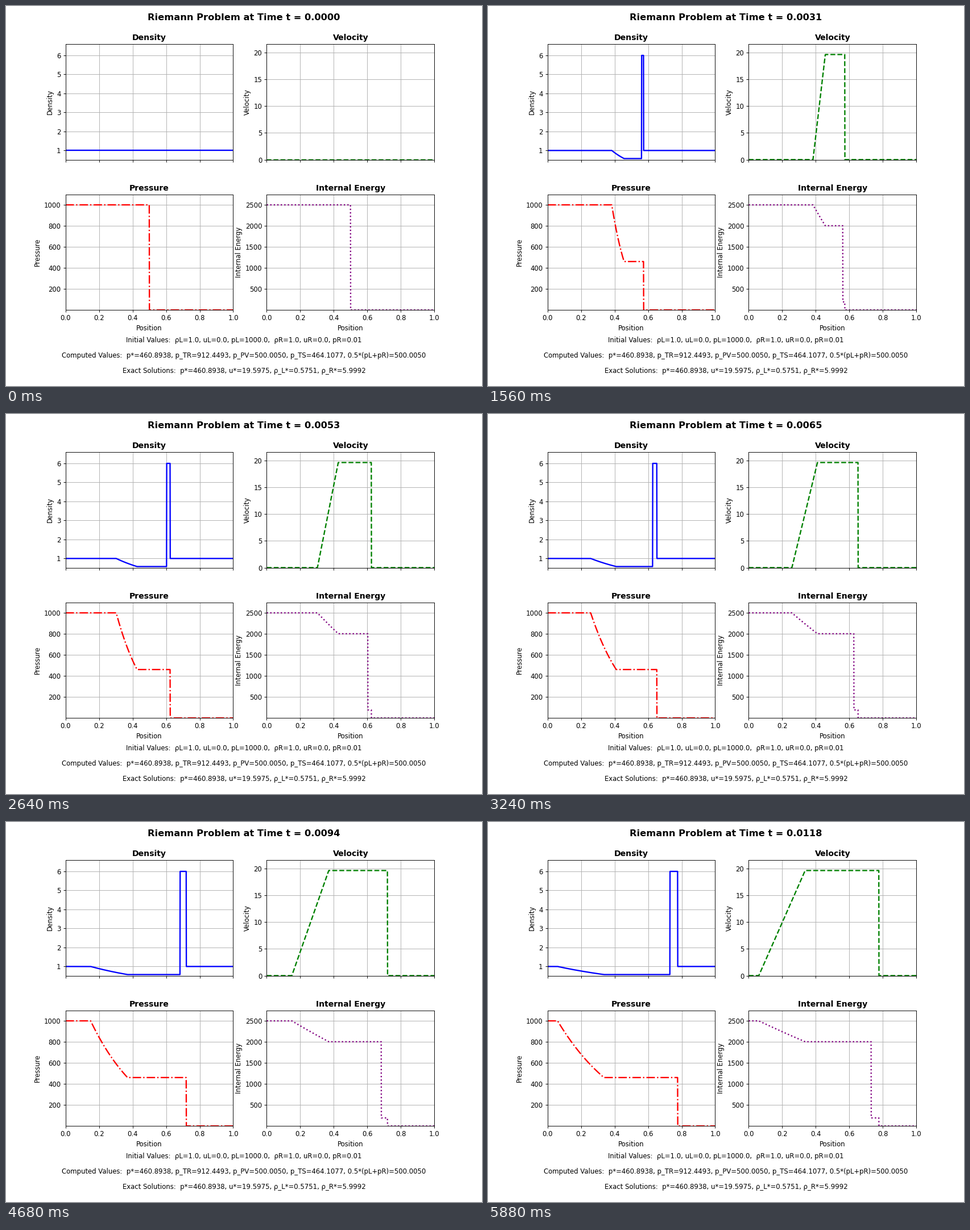
A matplotlib script for the animation above (6000 ms loop, 837x669 px).

```python
import numpy as np
import matplotlib.pyplot as plt
from matplotlib.animation import FuncAnimation

WIDTH, HEIGHT, DPI = 837, 669, 83.7
FRAMES, INTERVAL, DT = 50, 120, 0.00024

# Shock tube states: density, pressure; both sides start at rest.
GAMMA = 1.4
RHO_L, P_L = 1.0, 1000.0
RHO_R, P_R = 1.0, 0.01
P_STAR, U_STAR = 460.8938, 19.5975
RHO_L_STAR, RHO_R_STAR = 0.5751, 5.9992

A_L = np.sqrt(GAMMA * P_L / RHO_L)
A_STAR = A_L * (P_STAR / P_L) ** ((GAMMA - 1) / (2 * GAMMA))
SHOCK = U_STAR * RHO_R_STAR / (RHO_R_STAR - RHO_R)

x = np.linspace(0, 1, 1000)


def energy(p, rho):
    return p / ((GAMMA - 1) * rho)


def solve(t):
    """Density, velocity, pressure and internal energy at time t."""
    d = x - 0.5
    regions = [d < -A_L * t, d < (U_STAR - A_STAR) * t, d < U_STAR * t, d < SHOCK * t]
    speed = d / max(t, 1e-12)
    fan_u = 2 / (GAMMA + 1) * (A_L + speed)
    ratio = np.clip(1 - (GAMMA - 1) / 2 * fan_u / A_L, A_STAR / A_L, 1)
    fan_rho = RHO_L * ratio ** (2 / (GAMMA - 1))
    fan_p = P_L * ratio ** (2 * GAMMA / (GAMMA - 1))

    rho = np.select(regions, [RHO_L, fan_rho, RHO_L_STAR, RHO_R_STAR], RHO_R)
    u = np.select(regions, [0.0, fan_u, U_STAR, U_STAR], 0.0)
    p = np.select(regions, [P_L, fan_p, P_STAR, P_STAR], P_R)
    return rho, u, p, energy(p, rho)


plt.rcParams["font.family"] = "DejaVu Sans"
# The small margin keeps the pixel size from being truncated.
fig, axes = plt.subplots(
    2, 2, sharex=True, dpi=DPI,
    figsize=((WIDTH + 0.001) / DPI, (HEIGHT + 0.001) / DPI),
)
fig.subplots_adjust(left=0.125, right=0.9, bottom=0.2, top=0.9, wspace=0.2, hspace=0.3)

panels = [
    ("Density", "blue", "-", 0.9 * RHO_L_STAR, 1.1 * RHO_R_STAR),
    ("Velocity", "green", "--", 0, 1.1 * U_STAR),
    ("Pressure", "red", "-.", 0.9 * P_R, 1.1 * P_L),
    ("Internal Energy", "purple", ":", 0.9 * energy(P_R, RHO_R), 1.1 * energy(P_L, RHO_L)),
]
lines = []
for ax, (name, color, style, low, high) in zip(axes.flat, panels):
    lines += ax.plot([], [], color=color, linestyle=style, linewidth=2)
    ax.set_title(name, fontsize=12, fontweight="bold")
    ax.set_ylabel(name)
    ax.set_xlim(0, 1)
    ax.set_ylim(low, high)
    ax.grid(True)
for ax in axes[1]:
    ax.set_xlabel("Position")

heading = fig.suptitle("", fontsize=14, fontweight="bold")
notes = [
    "Initial Values:  ρL=1.0, uL=0.0, pL=1000.0,  ρR=1.0, uR=0.0, pR=0.01",
    "Computed Values:  p*=460.8938, p_TR=912.4493, p_PV=500.0050, "
    "p_TS=464.1077, 0.5*(pL+pR)=500.0050",
    "Exact Solutions:  p*=460.8938, u*=19.5975, ρ_L*=0.5751, ρ_R*=5.9992",
]
for y, note in zip((0.12, 0.08, 0.04), notes):
    fig.text(0.5, y, note, ha="center", va="center", fontsize=10)


def update(frame):
    t = frame * DT
    for line, values in zip(lines, solve(t)):
        line.set_data(x, values)
    heading.set_text(f"Riemann Problem at Time t = {t:.4f}")
    return [*lines, heading]


anim = FuncAnimation(
    fig, update, frames=FRAMES, interval=INTERVAL,
    init_func=lambda: update(0), repeat=True, repeat_delay=0,
)
plt.show()
```
